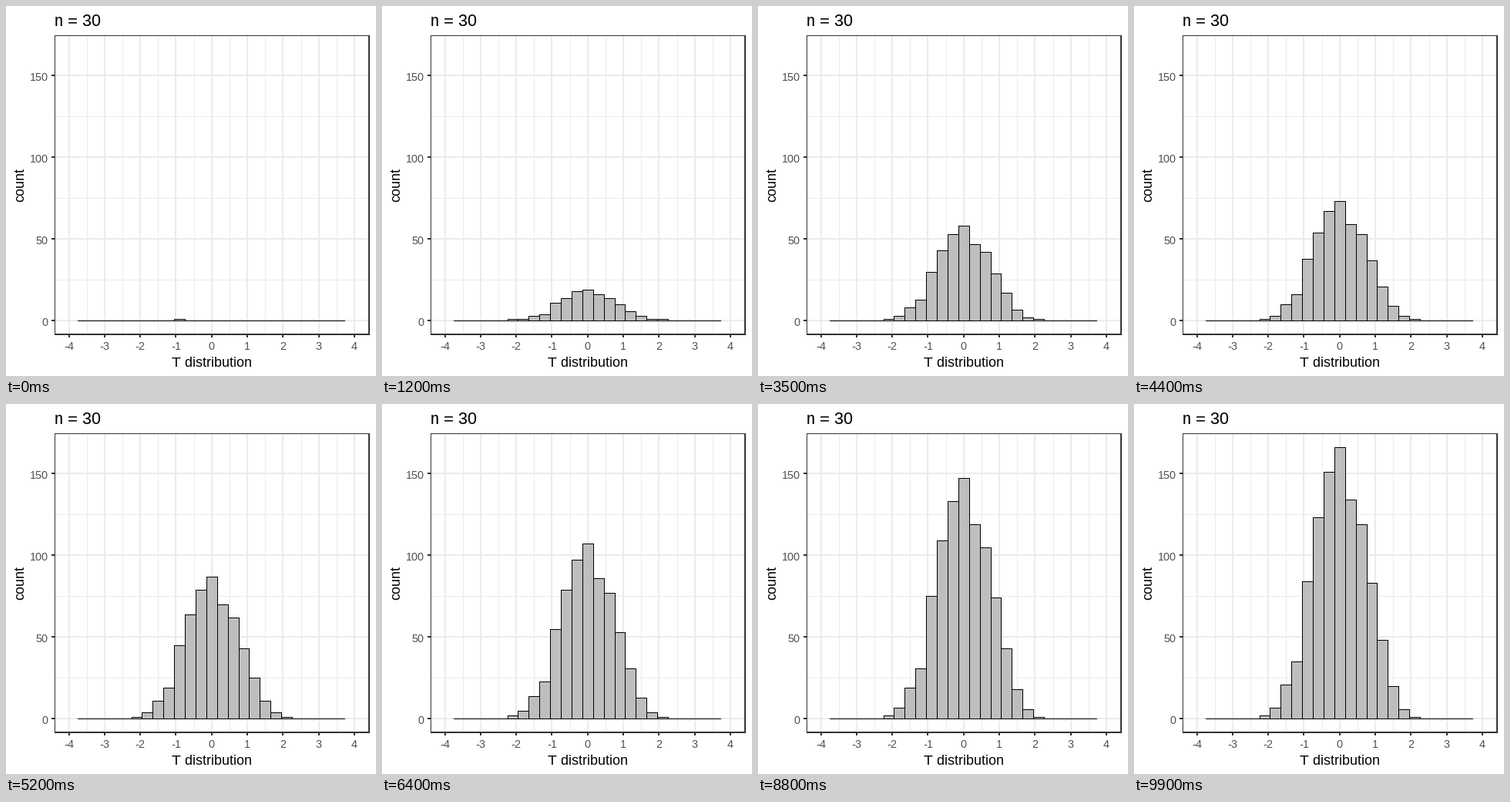
A matplotlib script that plays this animation: 480x480 px, repeating every 10 s.

```python
import numpy as np
import matplotlib.pyplot as plt
from matplotlib.animation import FuncAnimation
from matplotlib.patches import Rectangle

SIZE, DPI = 480, 72
FRAMES = 100
LEFT, RIGHT, TOP, BOTTOM = 63.56, 471, 38.9, 426.5
X_UNIT = (RIGHT - LEFT) / 8.8
Y_UNIT = (BOTTOM - TOP) / 182.6
X_ZERO = (LEFT + RIGHT) / 2
Y_ZERO = BOTTOM - 8.3 * Y_UNIT
GRID, DARK, LABEL, FILL = "#ebebeb", "#333333", "#4d4d4d", "#bebebe"

# Bar heights once every sample has arrived; the bars are 0.3 wide from -2.25
FINAL = np.array([2, 7, 21, 35, 84, 123, 151, 166, 134, 119, 83, 48, 20, 6, 1])
FIRST_BIN = 4


def sample_order():
    """Bin of every sample in order of arrival; each bar grows steadily."""
    left = FINAL.copy()
    left[FIRST_BIN] -= 1
    arrivals = [((i + 0.1) / n, b) for b, n in enumerate(left) for i in range(n)]
    return np.array([FIRST_BIN] + [b for _, b in sorted(arrivals)])


def px(x):
    return int(np.floor(X_ZERO + x * X_UNIT))


def py(y):
    return int(np.floor(Y_ZERO - y * Y_UNIT))


plt.rcParams.update({
    "font.family": "Liberation Sans",
    "text.hinting": "default",
    "text.hinting_factor": 1,
})
fig = plt.figure(figsize=(SIZE / DPI, SIZE / DPI), dpi=DPI, facecolor="white")
ax = fig.add_axes([0, 0, 1, 1])
ax.set_xlim(0, SIZE)
ax.set_ylim(SIZE, 0)
ax.axis("off")


def box(x0, y0, x1, y1, color, z):
    patch = Rectangle((x0, y0), x1 - x0, y1 - y0, facecolor=color,
                      linewidth=0, antialiased=False, zorder=z)
    return ax.add_patch(patch)


def label(x, y, text, size, color="black", ha="center", rotation=0):
    ax.text(x, y, text, fontsize=size, color=color, ha=ha, va="baseline",
            rotation=rotation, rotation_mode="anchor", zorder=6)


def draw_panel():
    x0, x1, y0, y1 = int(LEFT), int(RIGHT), int(TOP), int(BOTTOM)
    for v in np.arange(-3.5, 4):
        box(px(v), y0, px(v) + 1, y1, GRID, 1)
    for v in range(25, 126, 50):
        box(x0, py(v), x1, py(v) + 1, GRID, 1)
    for v in range(-4, 5):
        x = px(v)
        box(x - 1, y0, x + 1, y1, GRID, 2)
        box(x - 1, y1, x + 1, y1 + 4, DARK, 5)
        label(X_ZERO + v * X_UNIT - 0.5, 446, str(v), 14, LABEL)
    for v in range(0, 151, 50):
        y = py(v)
        box(x0, y - 1, x1, y + 1, GRID, 2)
        box(x0 - 4, y - 1, x0, y + 1, DARK, 5)
        label(54.5, y + 7, str(v), 14, LABEL, ha="right")
    # The border is clipped to one pixel at the left and the top
    box(x0, y0, x0 + 1, y1, DARK, 5)
    box(x0, y0, x1, y0 + 1, DARK, 5)
    box(x1 - 1, y0, x1 + 1, y1 + 1, DARK, 5)
    box(x0, y1 - 1, x1, y1 + 1, DARK, 5)
    label(63, 26, "n = 30", 22, ha="left")
    label(X_ZERO, 468, "T distribution", 18)
    label(23, 232, "count", 18, rotation=90)


draw_panel()
samples = sample_order()
edges = [px(-2.25 + 0.3 * i) for i in range(len(FINAL) + 1)]
base = py(0)
box(px(-3.75), base, px(3.75), base + 1, "black", 3)
outlines = [box(a, base, b + 1, base, "black", 3)
            for a, b in zip(edges, edges[1:])]
fills = [box(a + 1, base, b, base, FILL, 4) for a, b in zip(edges, edges[1:])]


def update(frame):
    shown = round(1 + frame * (len(samples) - 1) / (FRAMES - 1))
    counts = np.bincount(samples[:shown], minlength=len(FINAL))
    for n, outline, fill in zip(counts, outlines, fills):
        top = py(n)
        outline.set_y(top)
        outline.set_height(base + 1 - top)
        fill.set_y(top + 1)
        fill.set_height(base - top - 1)
        for patch in (outline, fill):
            patch.set_visible(bool(n))
    return outlines + fills


anim = FuncAnimation(fig, update, frames=FRAMES, interval=100,
                     init_func=lambda: update(0), repeat=True, repeat_delay=0)
plt.show()
```
